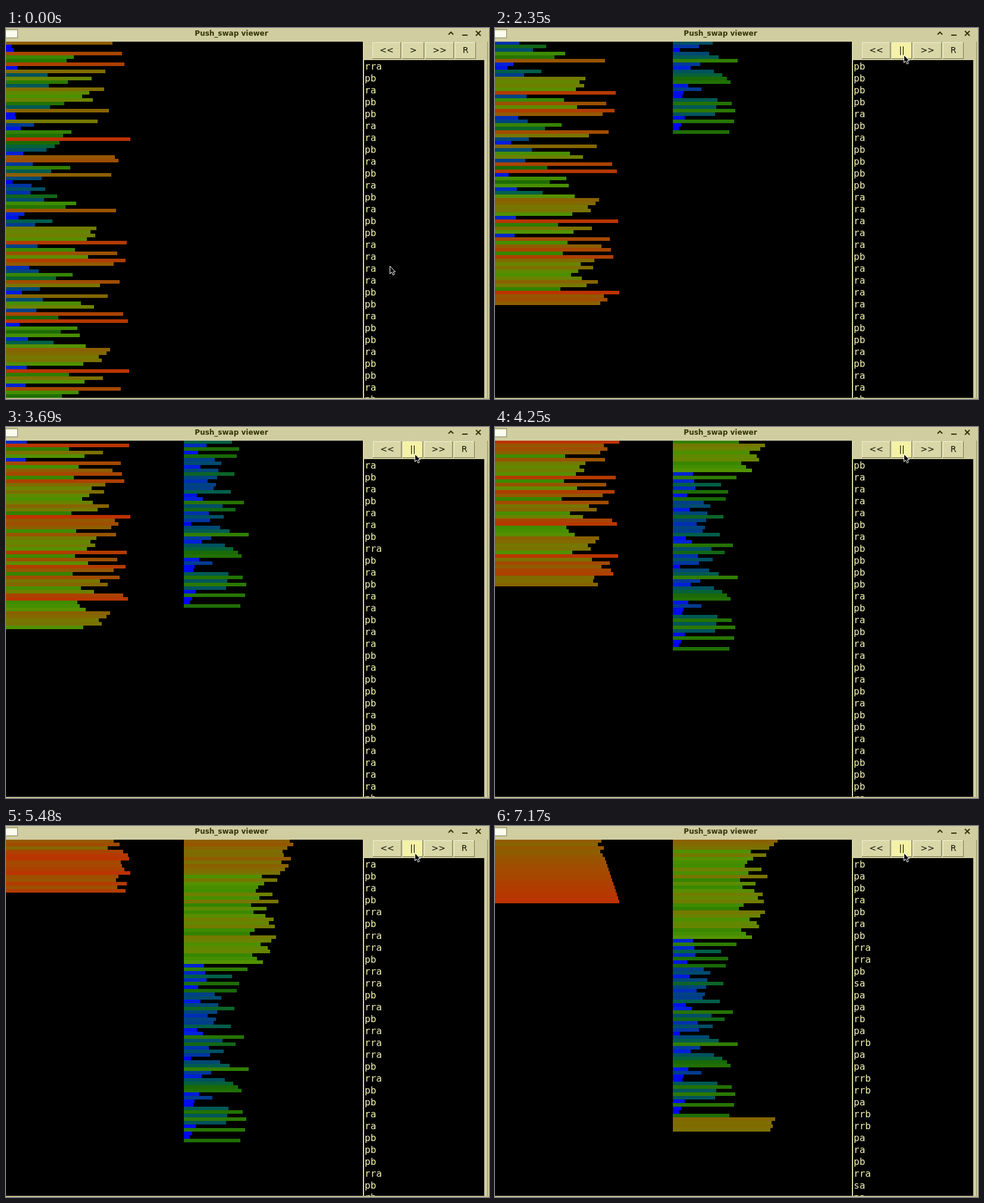
Recreate the animation shown at these times as an HTML page with a canvas. Size 812 by 624 pixels, loop 7.23 s.

```html
<!DOCTYPE html>
<html>
<head>
<meta charset="utf-8">
<title>Push_swap viewer</title>
<style>
html, body { margin: 0; width: 100%; height: 100%; overflow: hidden; background: #000; }
canvas { display: block; }
</style>
</head>
<body>
<canvas id="stage" width="812" height="624"></canvas>
<script>
const ctx = document.getElementById('stage').getContext('2d');
const LOOP = 7230, TICK = 51.2, LAST_TICK = 140;
const TAN = '#d0cda1', INK = '#333305';

// ---- The sort: every operation and the stacks after it ----
const a = [
  85, 1, 3, 93, 53, 47, 95, 6, 79, 31, 68, 48, 32, 78, 66, 60, 69, 45, 33, 82,
  4, 5, 73, 20, 9, 51, 44, 100, 41, 37, 30, 11, 87, 90, 19, 50, 34, 84, 26, 2,
  18, 29, 17, 39, 28, 55, 46, 88, 12, 7, 35, 21, 72, 67, 71, 64, 97, 23, 54, 89,
  65, 96, 86, 16, 24, 52, 38, 91, 75, 25, 10, 81, 27, 59, 70, 22, 94, 40, 98, 8,
  56, 42, 58, 15, 36, 63, 83, 80, 74, 76, 61, 14, 99, 49, 77, 62, 13, 92, 57, 43];
const b = [], ops = [], states = [[a.slice(), []]];

const moves = {
  pa: () => a.unshift(b.shift()),
  pb: () => b.unshift(a.shift()),
  sa: () => a.unshift(...a.splice(0, 2).reverse()),
  ra: () => a.push(a.shift()),
  rb: () => b.push(b.shift()),
  rra: () => a.unshift(a.pop()),
  rrb: () => b.unshift(b.pop())
};

function run(list) {
  for (const op of list.split(' ')) {
    moves[op]();
    ops.push(op);
    states.push([a.slice(), b.slice()]);
  }
}

// Turns the stack the shorter way until a wanted value is on top.
function seek(stack, name, wanted) {
  const first = stack.findIndex(wanted);
  let last = stack.length - 1;
  while (!wanted(stack[last])) last--;
  const up = first < stack.length - last;
  while (!wanted(stack[0])) run((up ? 'r' : 'rr') + name);
}

function takeFromB(wanted, count) {
  while (count--) { seek(b, 'b', wanted); run('pa'); }
}

function takeThree(max) {
  for (let v = max; v > max - 3; v--) takeFromB(x => x === v, 1);
}

function sortThree() {
  const [x, y, z] = a;
  if (x > z) run('ra pb rra sa pa');
  else if (y > z) run('pb sa pa');
}

function sortSix(max) {
  let turned = 0;
  for (let left = 3; left;) {
    if (a[0] <= max - 3) { run('pb'); left--; }
    else { run('ra'); turned++; }
  }
  while (turned--) run('rra');
  sortThree();
  takeThree(max - 3);
}

function takeSix(max) {
  takeFromB(v => v > max - 3 && v <= max, 3);
  sortThree();
  takeThree(max - 3);
}

for (let low = 0; a.length > 2;) {
  const half = a.length >> 1;
  low += half;
  for (let i = 0; i < half; i++) { seek(a, 'a', v => v <= low); run('pb'); }
}
takeFromB(v => v === 98, 1);
takeFromB(v => v === 97, 1);
takeThree(96);
takeSix(93);
takeFromB(v => v > 81 && v <= 87, 6);
sortSix(87);
takeSix(81);

// ---- Timing ----
const pace = [[0, 0], [20.5, 0], [28, 13], [46, 44], [62, 73], [83, 116], [107, 171], [140, 233]];

function lerp(knots, x) {
  let i = 1;
  while (i < knots.length - 1 && x > knots[i][0]) i++;
  const p = knots[i - 1], q = knots[i], u = (x - p[0]) / (q[0] - p[0]);
  return p.slice(1).map((v, j) => v + (q[j + 1] - v) * u);
}

// ---- Drawing ----
const hues = [
  [1, 0, 0, 250], [12, 0, 34, 215], [20, 0, 60, 145], [30, 0, 82, 96], [36, 0, 96, 72],
  [40, 24, 104, 8], [47, 40, 118, 0], [55, 62, 140, 0], [62, 82, 146, 0], [70, 110, 128, 0],
  [80, 130, 105, 0], [88, 152, 84, 0], [100, 188, 50, 0]];

function rect(x, y, w, h, color) {
  ctx.fillStyle = color;
  ctx.fillRect(x, y, w, h);
}

function text(str, x, y, font, color, align) {
  ctx.font = font;
  ctx.fillStyle = color;
  ctx.textAlign = align;
  ctx.fillText(str, x, y);
}

function path(points, width, color) {
  ctx.beginPath();
  for (const [x, y] of points) ctx.lineTo(x, y);
  ctx.lineWidth = width;
  ctx.strokeStyle = color;
  ctx.stroke();
}

function bars(stack, x) {
  stack.forEach((rank, i) => {
    const rgb = lerp(hues, rank).map(Math.round);
    rect(x - 1, 22 + 6 * i, Math.floor(2.02 * rank + 7.49) + 1, 6, `rgb(${rgb})`);
  });
}

function button(label, x, w, lit) {
  rect(x, 24, w, 28, '#77754f');
  rect(x, 24, w - 1, 27, '#f3f1cf');
  rect(x + 1, 25, w - 2, 26, lit ? '#f5f2a6' : '#d9d6a8');
  text(label, x + w / 2, 42, '14px "DejaVu Sans", sans-serif', '#111100', 'center');
}

function titleBar() {
  rect(0, 0, 812, 23, TAN);
  rect(0, 2, 20, 15, '#85835c');
  rect(0, 3, 19, 13, '#fbfbee');
  rect(0, 3, 19, 2, '#dfe5bd');
  text('Push_swap viewer', 379, 13, 'bold 12px "DejaVu Sans", sans-serif', INK, 'center');
  path([[744, 11], [748, 7], [752, 11]], 2, INK);
  path([[767, 12], [776, 12]], 2, INK);
  path([[790, 5], [798, 13]], 2, INK);
  path([[798, 5], [790, 13]], 2, INK);
}

function pointer(x, y) {
  ctx.save();
  ctx.translate(x + .5, y + .5);
  ctx.beginPath();
  for (const [px, py] of [[0, 0], [0, 13], [3, 10], [5, 15], [7.5, 14], [5.5, 9.5], [9, 9.5]]) ctx.lineTo(px, py);
  ctx.closePath();
  ctx.fillStyle = '#000';
  ctx.fill();
  ctx.lineWidth = 1;
  ctx.strokeStyle = '#fff';
  ctx.stroke();
  ctx.restore();
}

function draw(time) {
  const tick = Math.min(LAST_TICK, Math.floor((time + 7) / TICK));
  const done = Math.round(lerp(pace, tick)[0]);
  const playing = done > 0;
  const u = Math.max(0, Math.min(1, (tick - 6) / 11)), ease = u * u * (3 - 2 * u);
  const mx = 645 + 42 * ease, my = 400 - 355 * ease;

  rect(0, 0, 812, 624, '#000');
  bars(states[done][0], 0);
  bars(states[done][1], 300);

  const start = Math.max(0, done - 1);
  ops.slice(start, start + 29).forEach((op, i) =>
    text(op, 603, 70 + 20 * i, '16px "DejaVu Sans Mono", monospace', '#f6f6b0', 'left'));

  titleBar();
  rect(600, 23, 212, 31, TAN);
  rect(600, 23, 2, 601, '#dcd9ac');
  rect(804, 23, 8, 601, TAN);
  rect(809, 23, 1, 601, '#8d8a62');
  rect(0, 622, 812, 2, '#bdba90');

  const lit = my < 52;
  if (playing) {
    button('<<', 617, 48);
    button('||', 667, 34, lit);
    button('>>', 703, 48);
    button('R', 753, 35);
  } else {
    button('<<', 616, 48);
    button('>', 666, 37, lit);
    button('>>', 705, 48);
    button('R', 755, 35);
  }
  pointer(Math.round(mx), Math.round(my));
}

const begin = performance.now();
function loop() {
  draw((performance.now() - begin) % LOOP);
  requestAnimationFrame(loop);
}
loop();
</script>
</body>
</html>
```
